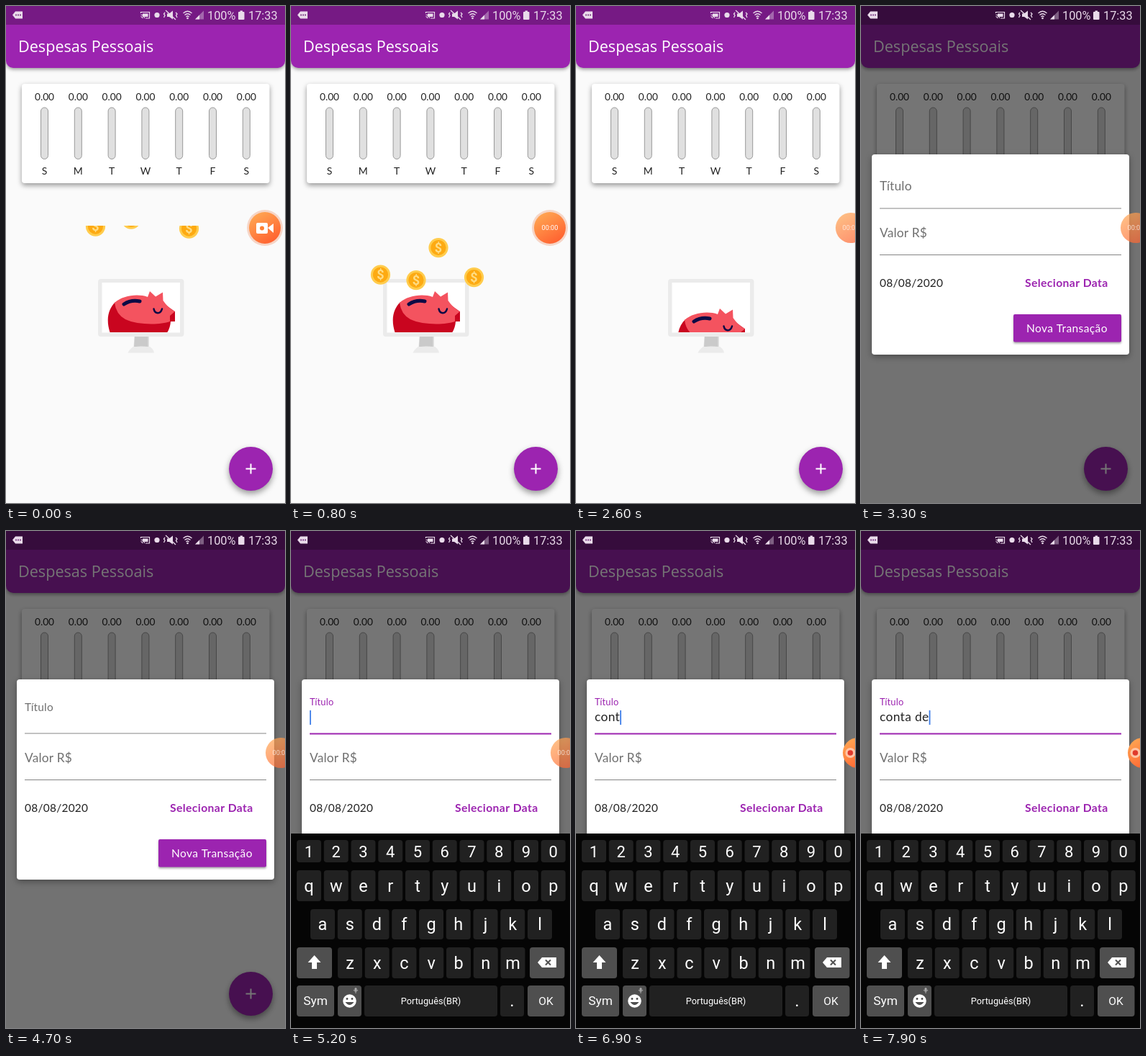
Recreate the animation shown at these times as an HTML page with a canvas. Size 388 by 690 pixels, loop 8 s.

```html
<!DOCTYPE html>
<html lang="pt-BR">
<head>
<meta charset="utf-8">
<title>Despesas Pessoais</title>
<style>
html, body { margin: 0; width: 100%; height: 100%; overflow: hidden; background: #fafafa; }
canvas { display: block; width: 388px; height: 690px; }
</style>
</head>
<body>
<canvas id="stage"></canvas>
<script>
const W = 388, H = 690, LOOP = 8000;
const PURPLE = '#9c24b0', NAVY = '#0d0b45', RED = '#c9051f', PINK = '#f4535f';
const LATO = 'Lato, sans-serif', ROBOTO = 'Roboto, sans-serif', OPEN = '"Open Sans", sans-serif';

const canvas = document.getElementById('stage');
const dpr = window.devicePixelRatio || 1;
canvas.width = W * dpr;
canvas.height = H * dpr;
const c = canvas.getContext('2d');

const clamp = v => Math.max(0, Math.min(1, v));
const part = (t, from, to) => clamp((t - from) / (to - from));
const mix = (a, b, p) => a + (b - a) * p;
const ease = p => p * p * (3 - 2 * p);
const easeOut = p => 1 - (1 - p) ** 2;

function box(x, y, w, h, r, fill) {
  c.beginPath();
  c.roundRect(x, y, w, h, r);
  c.fillStyle = fill;
  c.fill();
}
function disc(x, y, r, fill) {
  c.beginPath();
  c.arc(x, y, r, 0, Math.PI * 2);
  c.fillStyle = fill;
  c.fill();
}
function shape(d, fill) {
  c.fillStyle = fill;
  c.fill(new Path2D(d));
}
function line(d, color, width = 1) {
  c.strokeStyle = color;
  c.lineWidth = width;
  c.stroke(new Path2D(d));
}
function text(s, x, y, font, color, align = 'left', spacing = 0) {
  c.font = font;
  c.fillStyle = color;
  c.textAlign = align;
  c.letterSpacing = spacing + 'px';
  c.fillText(s, x, y);
}
function layer(draw) {
  c.save();
  draw();
  c.restore();
}
function shadowed(blur, dy, alpha, draw) {
  layer(() => {
    c.shadowColor = `rgba(0,0,0,${alpha})`;
    c.shadowBlur = blur * dpr;
    c.shadowOffsetY = dy * dpr;
    draw();
  });
}

function drawHeader() {
  shadowed(5, 2, .4, () => box(0, 0, W, 86, [0, 0, 10, 10], PURPLE));
  box(0, 0, W, 26, 0, '#761a84');
  text('Despesas Pessoais', 17, 64, '21.6px ' + OPEN, '#fff');
}

function drawChart() {
  shadowed(7, 3, .4, () => box(22, 108, 344.5, 138, 4, '#fff'));
  [...'SMTWTFS'].forEach((day, i) => {
    const x = 53.5 + 46.8 * i;
    text('0.00', x, 130.5, '13.7px ' + LATO, '#222', 'center');
    box(x - 5, 141, 10, 71.5, 5, '#e0e0e0');
    c.strokeStyle = '#999';
    c.lineWidth = 1;
    c.stroke();
    text(day, x, 233.5, '14px ' + LATO, '#222', 'center');
  });
}

function drawPig(t) {
  box(128, 379, 119.5, 80, 4, '#ebebeb');
  box(133.5, 384, 108.5, 69.5, 0, '#fff');
  shape('M178.500 459H199V474H177.500Z', '#e2e2e2');
  shape('M179 459H197.500V473Q184 471 178 474Z', '#cacaca');
  shape('M177 473H200Q205 476 206 481.500H169.500Q172 476 177 473Z', '#ebebeb');
  layer(() => {
    c.beginPath();
    c.rect(133.5, 384, 108.5, 69);
    c.clip();
    c.translate(0, 24 * ease(part(t, 1650, 2100)));
    shape('M152 411C141 422 138 438 147 460H218Q228 452 229 438H234.500V424L222 415Z', RED);
    shape('M151 412C162 402 183 399 197 404L200 396 208 403.500 218 397.500 218.500 409Q226 420 235 424V431L228 438C214 443 183 443 166 435Q153 428 151 412Z', PINK);
    shape('M228 438L228 430 235 424V438Z', RED);
    c.lineCap = 'round';
    line('M164 414Q174 407.500 186 410', NAVY, 5);
    line('M205.500 420.500C207 428 215 428 217 420.500', NAVY, 2.5);
  });
}

// x, height at load, height after 800 ms
const COINS = [[124.5, 306, 373], [174, 296, 380.5], [205, 260, 335.5], [254.5, 309, 376.5]];

function drawCoins(t) {
  const fade = 1 - part(t, 1650, 2100);
  if (!fade) return;
  layer(() => {
    c.beginPath();
    c.rect(100, 305, 180, 180);
    c.clip();
    c.globalAlpha = fade;
    const drift = 30 * easeOut(part(t, 800, 1900));
    for (const [x, a, b] of COINS) {
      const y = mix(a, b, part(t, 0, 800)) + drift;
      disc(x, y, 13.6, '#ffcc4d');
      disc(x, y, 10.6, '#fdaa12');
      text('$', x, y + 6.3, 'bold 18px ' + ROBOTO, '#ffdc83', 'center');
    }
  });
}

function drawFab() {
  shadowed(8, 4, .4, () => disc(340.5, 642.5, 30.5, PURPLE));
  line('M333.500 642.500H347.500M340.500 635.500V649.500', '#fff', 2);
}

function drawField(label, y, p, value) {
  const color = p > .5 ? PURPLE : '#707070';
  const size = mix(17.3, 12.8, p);
  text(label, 26, mix(y, y - 14, p), `${size}px ${LATO}`, color, 'left', .2);
  box(26, y + 24.5, 336, p > .5 ? 2 : 1, 0, p > .5 ? PURPLE : '#858585');
  if (p < 1) return;
  text(value, 26, y + 8, '17.3px ' + LATO, '#222', 'left', .4);
  const end = 26 + c.measureText(value).width;
  box(end, y - 7, 1.8, 20, 0, '#3f7ee8');
}

function drawDialog(t, value) {
  const p = part(t, 3040, 3240);
  if (!p) return;
  c.fillStyle = `rgba(0,0,0,${.54 * p})`;
  c.fillRect(0, 0, W, H);
  layer(() => {
    c.globalAlpha = easeOut(p);
    shadowed(8, 3, .35, () => box(15, 206, 358, 278, 4, '#fff'));
    drawField('Título', 256, ease(part(t, 4620, 4800)), value);
    drawField('Valor R$', 320.5, 0, '');
    text('08/08/2020', 26, 389.5, '15.4px ' + LATO, '#222', 'left', .3);
    text('Selecionar Data', 228, 389.5, 'bold 15.7px ' + LATO, PURPLE, 'left', .4);
    shadowed(3, 2, .35, () => box(212, 428, 150, 38.5, 2, PURPLE));
    text('Nova Transação', 230, 453, '15.5px ' + LATO, '#fff', 'left', .4);
  });
}

// Keyboard
const STEP = 37.75, KEY = 34, DARK = '#212121', GREY = '#4f4f4f';
const ROWS = [
  ['1234567890', 8, 429, 31], ['qwertyuiop', 8, 471, 43],
  ['asdfghjkl', 27, 525, 42], ['zxcvbnm', 65, 578, 43]
];
const TAPS = [['c', 6000], ['o', 6300], ['n', 6600], ['t', 6800], ['a', 7100], [' ', 7300], ['d', 7600], ['e', 7800]];
const HOLD = 100;

const typed = t => TAPS.filter(([, at]) => t >= at + HOLD).map(([ch]) => ch).join('');
const pressed = t => (TAPS.find(([, at]) => t >= at && t < at + HOLD) || [''])[0];

function drawKeyboard(t) {
  if (t < 5200) return;
  const down = pressed(t);
  let popup = null;
  box(0, 420, W, 270, 0, '#050505');
  for (const [letters, left, y, h] of ROWS) {
    [...letters].forEach((ch, i) => {
      const x = left + STEP * i;
      box(x, y, KEY, h, 4, ch === down ? '#3d3d3d' : DARK);
      text(ch, x + KEY / 2, y + h / 2 + 8, `${h < 40 ? 22 : 23.5}px ${ROBOTO}`, '#fff', 'center');
      if (ch === down) popup = [ch, x - 15, y - 62];
    });
  }
  box(8, 578, 49, 43, 4, GREY);
  shape('M32.500 589L41.500 599H36V608H29V599H23.500Z', '#fff');
  box(332, 578, 48.5, 43, 4, GREY);
  shape('M343 599L349 592H369V606H349Z', '#fff');
  line('M354 595.500L361 602.500M361 595.500L354 602.500', GREY, 2);

  box(8, 631, 52, 43, 4, GREY);
  text('Sym', 34, 658, '17.3px ' + ROBOTO, '#fff', 'center');
  box(65, 631, 33, 43, 4, GREY);
  disc(81.5, 652.5, 9.3, '#fff');
  disc(78, 649.5, 1.4, GREY);
  disc(85, 649.5, 1.4, GREY);
  shape('M75.500 654H87.500Q81.500 662 75.500 654Z', GREY);
  box(88.5, 634, 3, 5, 1.5, '#aaa');
  line('M87 637Q90 642 93 637M90 640V642', '#aaa');
  box(102, 631, 185, 43, 4, down === ' ' ? '#3d3d3d' : DARK);
  text('Português(BR)', 194.5, 657, '12.8px ' + ROBOTO, '#fff', 'center');
  box(291, 631, 33, 43, 4, DARK);
  text('.', 307.5, 660, '24px ' + ROBOTO, '#fff', 'center');
  box(329, 631, 51.5, 43, 4, GREY);
  text('OK', 354.5, 658, '15.5px ' + ROBOTO, '#fff', 'center');

  if (popup) {
    const [ch, x, y] = popup;
    box(x, y, 64, 58, 5, '#3d3d3d');
    text(ch, x + 32, y + 39, '32px ' + ROBOTO, '#fff', 'center');
  }
}

function drawStatus() {
  const ink = '#e9dbea';
  shape('M9 12.500L13 7.500H23V17.500H13Z', ink);
  for (const x of [14, 17, 20]) disc(x, 12.5, 1, '#6b2475');
  line('M187.500 10V8.500H199.500V17H194M187.500 12Q192 13 192.500 17M187.500 14.500Q189.500 15 190 17', ink, 1.2);
  box(190, 10.5, 7.5, 4.5, 0, ink);
  disc(210, 12.5, 3.6, ink);
  shape('M224 10.500H227L232 6.500V18.500L227 15H224Z', ink);
  line('M222 6L236 19M221 9L219.500 11 221 13 219.500 16M236 9L238 11 236.500 13 238 16', ink, 1.3);
  line('M246.500 10Q252.500 4.500 258.500 10M248.500 12.500Q252.500 9 256.500 12.500M250.500 15Q252.500 13 254.500 15', ink, 1.3);
  disc(252.5, 17, 1.3, ink);
  shape('M263 18.500L275 6.500V18.500Z', 'rgba(233,219,234,.4)');
  shape('M263 18.500L269 12.500V18.500Z', ink);
  text('100%', 280, 18.5, '16.3px ' + ROBOTO, ink);
  box(323, 8, 8.5, 11, 1, ink);
  box(325.5, 6.5, 3.5, 2, 0, ink);
  text('17:33', 337, 18.5, '16.3px ' + ROBOTO, ink);
}

function drawRecorder(t) {
  const away = ease(part(t, 1650, 2000)), tuck = part(t, 6000, 6200);
  const x = 360 + 22 * away + 10 * tuck, y = 308;
  const idle = away * (1 - tuck);
  layer(() => {
    c.globalAlpha = 1 - away;
    disc(x, y, 25, '#f6d5c6');
  });
  layer(() => {
    c.globalAlpha = 1 - .3 * idle;
    const g = c.createLinearGradient(x - 12, y - 20, x + 12, y + 20);
    g.addColorStop(0, '#ffa552');
    g.addColorStop(1, '#ff6130');
    disc(x, y, 22 - away, g);
    if (t < 300) {
      box(x - 12, y - 7, 16, 15, 2, '#fff');
      shape(`M${x + 4} ${y}L${x + 12} ${y - 6}V${y + 7}Z`, '#fff');
      disc(x - 4, y + .5, 3, '#ff8034');
    } else if (tuck < .5) {
      const sec = [1400, 2400, 3300, 4300, 5300].filter(at => t >= at).length;
      text('00:0' + sec, x, y + 3.3, '9.2px ' + ROBOTO, '#fff', 'center');
    } else {
      disc(x - 10.5, y, 7, '#ffc4a4');
      disc(x - 10.5, y, 3.8, '#e03a2c');
    }
  });
}

function frame(now) {
  const t = now % LOOP;
  c.setTransform(dpr, 0, 0, dpr, 0, 0);
  c.fillStyle = '#fafafa';
  c.fillRect(0, 0, W, H);
  drawHeader();
  drawChart();
  drawPig(t);
  drawCoins(t);
  drawFab();
  drawDialog(t, typed(t));
  drawKeyboard(t);
  drawStatus();
  drawRecorder(t);
}

const start = performance.now();
function tick() {
  frame(performance.now() - start);
  requestAnimationFrame(tick);
}
tick();
</script>
</body>
</html>
```
